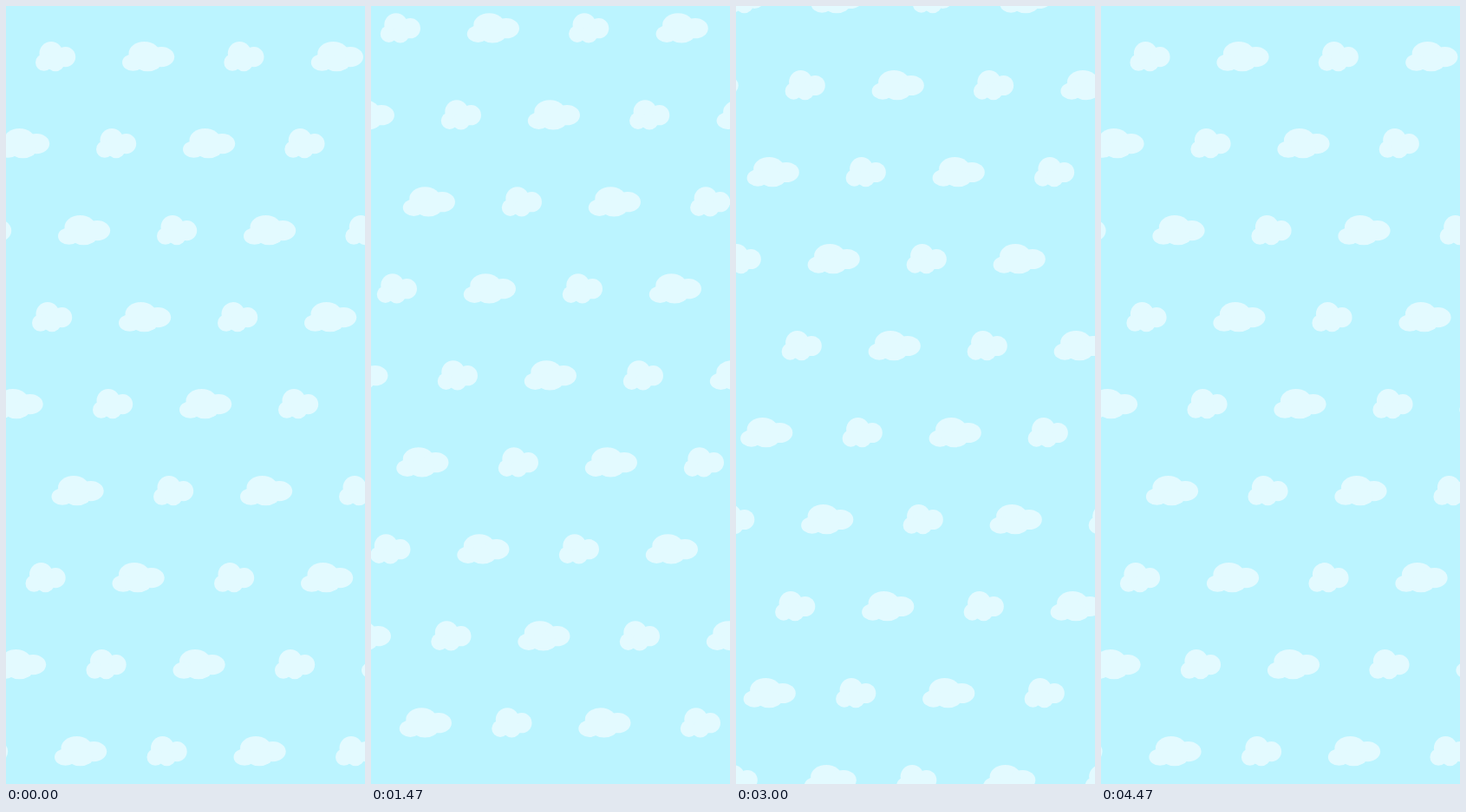
Write an HTML page that moves like this. It is 414 px wide and 896 px high and loops after 4500 ms.

```html
<!DOCTYPE html>
<html lang="en">
<head>
<meta charset="utf-8">
<title>Drifting clouds</title>
<style>
  html, body { margin: 0; width: 100%; height: 100%; overflow: hidden; background: #bbf4ff; }
  svg { display: block; width: 414px; height: 896px; }
</style>
</head>
<body>
<svg viewBox="0 0 414 896" xmlns="http://www.w3.org/2000/svg">
  <defs>
    <g id="small">
      <circle cx="18" cy="14" r="13.5"/>
      <circle cx="34.6" cy="18" r="11.6"/>
      <circle cx="9.8" cy="24.4" r="9.8"/>
      <ellipse cx="23" cy="25.5" rx="10" ry="9.2"/>
    </g>
    <g id="large">
      <ellipse cx="25.5" cy="14" rx="18" ry="13.5"/>
      <ellipse cx="45.2" cy="18" rx="15" ry="11.6"/>
      <ellipse cx="12.6" cy="24.4" rx="12.6" ry="9.8"/>
      <ellipse cx="29.5" cy="25.3" rx="15" ry="9.4"/>
    </g>
  </defs>
  <rect width="414" height="896" fill="#bbf4ff"/>
  <g id="sky" fill="#e3faff"></g>
</svg>
<script>
const LOOP = 4500, STEP = 30;
const ROWS = 10, TOP = 40.6, ROW_X = 70, ROW_Y = 100;
const DRIFT_X = 70.6, DRIFT_Y = 100;

// Left edge of each diagonal line of clouds in the top row; kinds alternate.
const lines = [-604, -504, -397.5, -297.5, -180, -80, 34, 134, 251.3, 351.8];
const sky = document.getElementById('sky');

function addCloud(kind, x, y) {
  const cloud = document.createElementNS('http://www.w3.org/2000/svg', 'use');
  cloud.setAttribute('href', '#' + kind);
  cloud.setAttribute('x', x);
  cloud.setAttribute('y', y);
  sky.appendChild(cloud);
}

lines.forEach((start, i) => {
  for (let row = 0; row < ROWS; row++) {
    const x = start + row * ROW_X;
    if (x > -62 && x < 414 + DRIFT_X) {
      addCloud(i % 2 ? 'large' : 'small', x, TOP + row * ROW_Y);
    }
  }
});

function draw(ms) {
  const t = Math.floor((ms % LOOP) / STEP) * STEP;
  const p = t / (LOOP - STEP);
  sky.setAttribute('transform', `translate(${-DRIFT_X * p} ${-DRIFT_Y * p})`);
}

const begin = performance.now();
function tick() {
  draw(performance.now() - begin);
  requestAnimationFrame(tick);
}
draw(0);
requestAnimationFrame(tick);
</script>
</body>
</html>
```
